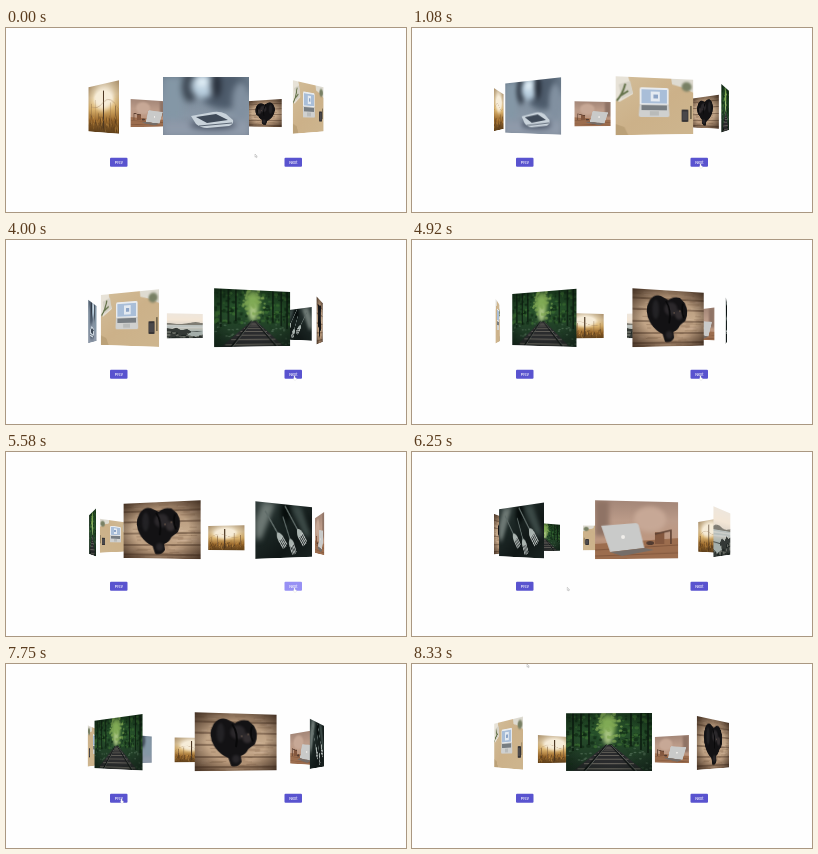
Animation of 400 by 184 pixels, one loop 8410 ms. Source, as an HTML page:

```html
<!DOCTYPE html>
<html lang="en">
<head>
<meta charset="utf-8">
<title>Photo carousel</title>
<style>
html, body { margin: 0; width: 100%; height: 100%; overflow: hidden; background: #fefefe; }
#stage { position: absolute; left: 0; top: 0; width: 400px; height: 184px; overflow: hidden; perspective: 258px; perspective-origin: 200.2px 92px; }
#ring { position: absolute; left: 157.2px; top: 48.5px; width: 86px; height: 58px; transform-style: preserve-3d; }
.card { position: absolute; left: 0; top: 0; width: 86px; height: 58px; overflow: hidden; }
.card svg { display: block; overflow: hidden; }
#ui { position: absolute; left: 0; top: 0; }
#ui text { font: 500 3.7px Inter, Arial, sans-serif; fill: #fff; text-anchor: middle; }
</style>
</head>
<body>
<div id="stage"><div id="ring"></div></div>
<svg id="ui" width="400" height="184" viewBox="0 0 400 184">
  <rect id="prev" x="104" y="129.7" width="17.5" height="9" rx="1"/>
  <text x="112.8" y="135.5">Prev</text>
  <rect id="next" x="278.5" y="129.7" width="17.5" height="9" rx="1"/>
  <text x="287.3" y="135.5">Next</text>
  <g id="cursor">
    <path id="arrow" d="M0 0V3.2L.8 2.5 1.4 3.7 1.9 3.5 1.4 2.3H2.3Z" fill="#fff" stroke="#999" stroke-width=".4"/>
    <path id="hand" d="M0 0Q.8-.5 1 .3V1.5L2.4 2V3.4L1.8 4.2H.3L-.8 2.6-.2 2.4Z" fill="#fff" stroke="#bbb" stroke-width=".2"/>
  </g>
</svg>
<script>
const LOOP = 8410, TURN = 1000, STEP = 45, RADIUS = 176;
const clicks = [[690, 1], [3630, 1], [4600, 1], [5350, 1], [5670, 1],
                [6540, -1], [7060, -1], [7500, -1]];
const cursorPath = [[0, 249, 126], [590, 249, 126], [670, 288, 136], [5760, 288, 136],
                    [6400, 115, 135], [7760, 115, 135], [8140, 115, 0], [LOOP, 115, 0]];
const $ = id => document.getElementById(id);

const rect = (x, y, w, h, fill, extra = '') =>
  `<rect x="${x}" y="${y}" width="${w}" height="${h}" fill="${fill}" ${extra}/>`;
const path = (d, fill, extra = '') => `<path d="${d}" fill="${fill}" ${extra}/>`;
const line = (d, stroke, width, extra = '') => path(d, 'none', `stroke="${stroke}" stroke-width="${width}" ${extra}`);
const blob = (x, y, rx, ry, fill, extra = '') =>
  `<ellipse cx="${x}" cy="${y}" rx="${rx}" ry="${ry}" fill="${fill}" ${extra}/>`;
const soft = (size, body) => `<g style="filter:blur(${size}px)">${body}</g>`;
let gradients = 0;
function backdrop(colors, slanted) {
  const id = 'g' + gradients++;
  const stops = colors.map((c, i) => `<stop offset="${i / (colors.length - 1)}" stop-color="${c}"/>`).join('');
  return `<linearGradient id="${id}" x2="${slanted ? 1 : 0}" y2="1">${stops}</linearGradient>` + rect(0, 0, 86, 58, `url(#${id})`);
}
function vignette(color, strength) {
  const id = 'g' + gradients++;
  return `<radialGradient id="${id}" r=".72"><stop offset=".5" stop-color="${color}" stop-opacity="0"/>` +
    `<stop offset="1" stop-color="${color}" stop-opacity="${strength}"/></radialGradient>` + rect(0, 0, 86, 58, `url(#${id})`);
}
function random(seed) {
  return () => (seed = (seed * 16807) % 2147483647) / 2147483647;
}
function scatter(seed, count, draw) {
  const rnd = random(seed);
  return Array.from({ length: count }, () => draw(rnd)).join('');
}

function phone() {
  return backdrop(['#6b7c8c', '#7f8f9e', '#8896a5', '#75808f']) +
    soft(3, rect(0, 0, 20, 42, '#8497a6') + blob(62, 14, 26, 18, '#4d5b6b') +
      blob(27, 10, 8, 15, '#3a4450') + blob(40, 9, 12, 12, '#b9cede') + blob(39, 5, 6, 5, '#e4f0f7') +
      blob(53, 8, 5, 13, '#252c37') + blob(78, 25, 9, 20, '#8190a0') +
      rect(0, 44, 86, 16, '#8f9aaa') + blob(50, 48, 23, 4, '#424c5d')) +
    path('M28 39L50 35Q57 34 63 37L70 43Q71 47 66 49L44 51Q38 51 33 47Z', '#c9d3db') +
    path('M33 40L53 37 65 43 44 46Z', '#3f4a58') + line('M36 49L69 46', '#5b6674', 1);
}

function desk() {
  return backdrop(['#d2bd99', '#ccb189', '#cdb58e'], true) +
    path('M0 0H13L18 17 4 25 0 24Z', '#e7e2d7') + path('M3 8L15 4 18 16 6 22Z', '#d5d1c5') +
    line('M1 24Q7 18 10 7M5 19L13 14', '#65734b', 2) +
    path('M60 0H86V14L74 9 61 6Z', '#dedbd1') + soft(.8, blob(78, 8, 6, 5, '#788064')) +
    path('M25 12Q25 10 27 10H55Q57 10 57 12V27H25Z', '#e8ebee') + rect(27, 12, 28, 14, '#a9bed8') +
    rect(37, 14, 10, 10, '#e4eaf1') + rect(40, 17, 5, 4, '#8da4c5') +
    path('M25 27H57L58 38Q58 40 56 40H26Q24 40 24 38Z', '#cfd0cf') +
    rect(27, 28, 28, 5, '#777d82') + rect(36, 34, 10, 4.5, '#b9bbba') +
    rect(72, 32, 8, 13, '#363436', 'rx="1"') + rect(73, 34, 6, 9, '#4a484a') + rect(82, 28, 2, 14, '#76684e') +
    path('M0 47L9 50 13 58H0Z', '#bba178');
}

function railway() {
  const leaves = scatter(7, 190, r => {
    const x = r() * 86, y = r() * 35;
    const near = Math.hypot(x - 43, (y - 14) * .8) < 13;
    return blob(x, y, .8 + r() * 1.8, .6 + r() * 1.4, near ? '#7fa653' : r() < .6 ? '#102a14' : '#3d7032', 'opacity=".7"');
  });
  const grass = scatter(19, 110, r => blob(r() * 86, 34 + r() * 23, 1.5, .8, r() < .55 ? '#1c3a22' : '#5d7c62', 'opacity=".6"'));
  const ties = Array.from({ length: 9 }, (_, i) => {
    const y = 34 + i * i * .34, half = 3 + (y - 33) * 1.25;
    return line(`M${43 - half} ${y}H${43 + half}`, '#625f59', .5 + i * .1);
  }).join('');
  return backdrop(['#1d4020', '#26502a', '#213f27', '#1f3226']) +
    soft(2, blob(42, 13, 8, 13, '#80aa55') + blob(42, 24, 5, 8, '#a9c582')) + leaves +
    line('M7 0V38M15 0V35M23 0V32M65 0V33M75 0V37M82 0V40', '#0d1d11', 1.6) + grass +
    path('M40 32H46L78 58H7Z', '#2a2b2d') + ties +
    line('M41 32L18 58M45 32L69 58', '#101413', 1.9) + line('M41.3 32L19.5 58M45.3 32L70.5 58', '#888d88', .6) +
    vignette('#06120a', .6);
}

function dog() {
  const grain = scatter(31, 110, r => {
    const x = r() * 80, y = r() * 58;
    return line(`M${x} ${y}h${4 + r() * 13}`, r() < .5 ? '#7f6149' : '#d3baa0', .5, 'opacity=".75"');
  });
  return backdrop(['#a98b6f', '#c5a98b', '#b39274']) + grain +
    line('M0 9H86M0 20H86M0 32H86M0 44H86M0 54H86', '#5b4230', 1) + vignette('#2a1a10', .85) +
    path('M19 11Q25 4 32 6L41 10Q47 5 55 7L61 12Q67 21 62 31L55 36Q53 41 47 43L48 49Q44 55 37 53L34 45Q26 42 20 34 12 22 19 11Z', '#131214') +
    soft(1, blob(44, 19, 8, 7, '#2b282b') + blob(26, 20, 4, 10, '#232225') + blob(54, 25, 5, 5, '#332e30') + blob(42, 46, 4, 4, '#282629')) +
    line('M38 11Q45 20 42 34M59 13Q56 20 60 28', '#080809', 2) + blob(55, 21, .7, .7, '#977a61') + blob(48, 23, .7, .7, '#977a61');
}

function forks() {
  const fork = (x, y, turn, scale) => `<g transform="translate(${x} ${y}) rotate(${turn}) scale(${scale})">` +
    line('M0-42L0-8', '#5f6b68', 2) + path('M-1-9Q-5-5-5 1H5Q5-5 1-9Z', '#a9b3af') +
    line('M-4 0V13M-1.3 0V14M1.3 0V14M4 0V13', '#dbe1df', 1.3) + '</g>';
  return backdrop(['#333f3d', '#1d2826', '#101716', '#1a2321'], true) +
    soft(3, path('M10 0H27L8 38H0V20Z', '#6d7874') + path('M50 0H66L84 34H72Z', '#3c4a47') + blob(43, 8, 8, 12, '#070d0c')) +
    fork(35, 37, -38, .85) + fork(52, 44, -24, .8) + fork(66, 33, -38, .95);
}

function laptop() {
  return backdrop(['#a48778', '#bb9b89', '#bd9780', '#93694d']) +
    soft(2, rect(0, 0, 14, 35, '#8f7365') + blob(56, 18, 17, 13, '#c7a896')) +
    path('M0 43L86 37V58H0Z', '#9c6d4e') + line('M0 49L86 44M0 55L86 52', '#7b5239', .8) +
    path('M6 25L41 22Q43 22 44 24L50 47 15 51Z', '#c9cac9') + blob(28, 36, 2, 2, '#f0eeea') +
    path('M15 51L50 47 60 49 27 55Z', '#756d68') +
    rect(61, 31, 10, 12, '#84583f') + line('M61 33L78 29V43', '#5d4032', 1.7) + blob(56, 42, 4, 2, '#513b31');
}

function beach() {
  return backdrop(['#eee6dc', '#f3e6d6', '#d8d0c5', '#9caaa7', '#687975']) +
    path('M0 22Q18 18 35 22T86 22V26H0Z', '#807d74') + rect(0, 26, 86, 8, '#b7bebb') +
    line('M0 29H86M0 33H72', '#e2dfd8', .9) +
    path('M86 34L73 36 63 33 52 39 38 36 28 42 0 40V58H86Z', '#343936') +
    scatter(41, 40, r => blob(r() * 86, 42 + r() * 16, 2 + r() * 5, 1 + r() * 2, r() < .5 ? '#202724' : '#646861')) +
    path('M0 41L28 43 38 50 17 54 0 49Z', '#a4aeaa');
}

function poles() {
  return backdrop(['#eadfc6', '#efdcb5', '#dcb56f', '#9c6a2d', '#5a3f1e']) +
    soft(3, blob(46, 16, 28, 15, '#f6ecd8')) +
    line('M9 22V50M24 18V50M64 23V48M77 27V47', '#81613f', 1.4) + line('M46 8V53', '#4d3824', 2.8) +
    line('M9 26Q27 31 46 22T86 32', '#a08160', .5) +
    scatter(53, 110, r => {
      const x = r() * 86, y = 41 + r() * 17;
      return line(`M${x} ${y}l${r() * 4 - 2} -${3 + r() * 4}`, r() < .6 ? '#4a331a' : '#cf9c4e', .6);
    }) + vignette('#6b4212', .55);
}

$('ring').innerHTML = [phone, desk, railway, dog, forks, laptop, beach, poles].map((draw, i) =>
  `<div class="card" style="transform:rotateY(${i * STEP}deg) translateZ(${RADIUS}px)">` +
  `<svg width="86" height="58" viewBox="0 0 86 58">${draw()}</svg></div>`).join('');

// The standard CSS "ease" curve.
function ease(x) {
  if (x <= 0) return 0;
  if (x >= 1) return 1;
  const bezier = (a, b, u) => 3 * a * u * (1 - u) ** 2 + 3 * b * u * u * (1 - u) + u ** 3;
  let low = 0, high = 1;
  for (let i = 0; i < 24; i++) {
    const mid = (low + high) / 2;
    if (bezier(.25, .25, mid) < x) low = mid; else high = mid;
  }
  return bezier(.1, 1, low);
}

// Each click starts a new turn from wherever the ring is at that moment.
function position(t) {
  let from = 0, target = 0, start = 0;
  const at = time => from + (target - from) * ease((time - start) / TURN);
  for (const [time, dir] of clicks) {
    if (time > t) break;
    from = at(time);
    target += dir;
    start = time;
  }
  return at(t);
}

function cursorAt(t) {
  const i = cursorPath.findIndex(([time], n) => n && time >= t);
  const [t0, x0, y0] = cursorPath[i - 1], [t1, x1, y1] = cursorPath[i];
  const k = (t - t0) / (t1 - t0);
  return [x0 + (x1 - x0) * k, y0 + (y1 - y0) * k];
}

function render(t) {
  $('ring').style.transform = `translateZ(${-RADIUS}px) rotateY(${-position(t) * STEP}deg)`;
  const pressed = dir => clicks.some(([time, d]) => d === dir && t > time - 150 && t < time);
  $('prev').setAttribute('fill', pressed(-1) ? '#8d84f7' : '#5953cf');
  $('next').setAttribute('fill', pressed(1) ? '#9790f4' : '#5953cf');
  const [x, y] = cursorAt(t);
  const over = y > 129 && y < 139 && (x > 278 && x < 296 || x > 104 && x < 122);
  $('cursor').setAttribute('transform', `translate(${x} ${y})`);
  $('arrow').style.display = over ? 'none' : '';
  $('hand').style.display = over ? '' : 'none';
}

const began = performance.now();
function frame() {
  render((performance.now() - began) % LOOP);
  requestAnimationFrame(frame);
}
frame();
</script>
</body>
</html>
```
